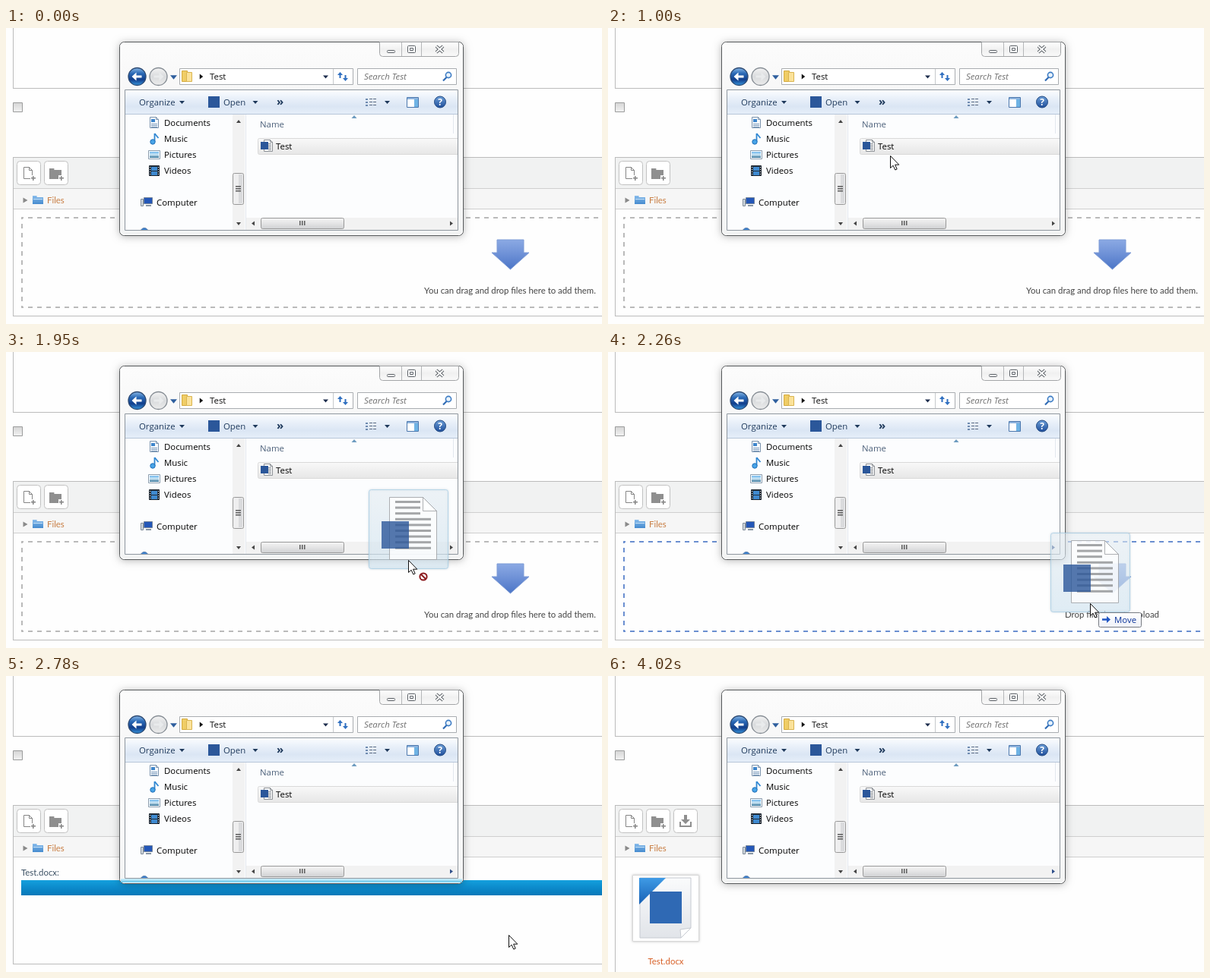
These frames come from a looping animation (784 px wide and 390 px high, 4.88 s). An HTML page with a canvas:

```html
<!DOCTYPE html>
<html lang="en">
<head>
<meta charset="utf-8">
<title>Drag and drop upload</title>
<style>
html, body { margin: 0; width: 100%; height: 100%; overflow: hidden; background: #fff; }
canvas { display: block; }
</style>
</head>
<body>
<canvas id="stage" width="784" height="390"></canvas>
<script>
const ctx = document.getElementById('stage').getContext('2d');
const LOOP = 4880;
const STEP = 78;
const UI = '11.4px "Open Sans", sans-serif';
const WEB = '11.4px Lato, sans-serif';
const LOGO = '#2b579a';
const INK = '#1e395b';

const ENTER = 300, HOVER = 1100, PRESS = 1180, GRAB = 1640, OVER_ZONE = 2030;
const DROP = 2780, DONE = 3090, LEAVE = 3790, GONE = 4020;

// Pointer stops; "out" above 1 slows towards the stop, below 1 speeds up
const STOPS = [
  { at: ENTER, x: 670, y: 362 },
  { at: 1000, x: 371, y: 168, out: 1.6 },
  { at: 1320, x: 364, y: 159, out: 1 },
  { at: GRAB, x: 367, y: 158, out: 1 },
  { at: 1950, x: 529, y: 274, out: .75 },
  { at: 2260, x: 634, y: 331, out: 1.7 },
  { at: 2700, x: 661, y: 341, out: 1.7 },
  { at: LEAVE, x: 661, y: 341, out: 1 },
  { at: GONE, x: 698, y: 388, out: 1 }
];

function pointerAt(t) {
  const next = STOPS.findIndex(stop => stop.at > t);
  const a = STOPS[next - 1], b = STOPS[next];
  const elapsed = Math.floor((t - a.at) / STEP) * STEP;
  const k = 1 - (1 - elapsed / (b.at - a.at)) ** b.out;
  return [Math.round(a.x + (b.x - a.x) * k), Math.round(a.y + (b.y - a.y) * k)];
}

// Drawing helpers

const rect = (x, y, w, h, fill) => { ctx.fillStyle = fill; ctx.fillRect(x, y, w, h); };

function rows(count, gap, x, y, w, h, fill) {
  for (let i = 0; i < count; i++) rect(x, y + i * gap, w, h, fill);
}

function fade(y0, y1, ...colors) {
  const g = ctx.createLinearGradient(0, y0, 0, y1);
  colors.forEach((c, i) => g.addColorStop(i / (colors.length - 1), c));
  return g;
}

function paint(fill, stroke, width = 1) {
  if (fill) { ctx.fillStyle = fill; ctx.fill(); }
  if (stroke) { ctx.strokeStyle = stroke; ctx.lineWidth = width; ctx.stroke(); }
}

function box(x, y, w, h, fill, stroke, r = 0) {
  ctx.beginPath();
  ctx.roundRect(x + .5, y + .5, w - 1, h - 1, r);
  paint(fill, stroke);
}

function poly(points, fill, stroke, width) {
  ctx.beginPath();
  points.forEach(([x, y]) => ctx.lineTo(x, y));
  ctx.closePath();
  paint(fill, stroke, width);
}

function line(x0, y0, x1, y1, color, width = 1) {
  ctx.beginPath();
  ctx.moveTo(x0, y0);
  ctx.lineTo(x1, y1);
  paint(null, color, width);
}

function disc(x, y, r, fill, stroke, width) {
  ctx.beginPath();
  ctx.arc(x, y, r, 0, Math.PI * 2);
  paint(fill, stroke, width);
}

function text(s, x, y, color, font = UI, align = 'left') {
  ctx.font = font;
  ctx.textAlign = align;
  ctx.fillStyle = color;
  ctx.fillText(s, x, y);
}

// Shapes below point down and turn clockwise in quarter turns
function turned(x, y, turns, drawShape) {
  ctx.save();
  ctx.translate(x, y);
  ctx.rotate(turns * Math.PI / 2);
  drawShape();
  ctx.restore();
}

function triangle(x, y, w, h, color, turns = 0) {
  turned(x, y, turns, () => poly([[-w / 2, -h / 2], [w / 2, -h / 2], [0, h / 2]], color));
}

function blockArrow(x, y, w, h, shaft, head, turns, fill, stroke) {
  const neck = h / 2 - head;
  const half = [[shaft / 2, -h / 2], [shaft / 2, neck], [w / 2, neck], [0, h / 2]];
  const mirror = half.map(([px, py]) => [-px, py]).reverse();
  turned(x, y, turns, () => poly([...half, ...mirror], fill, stroke));
}

function page(x, y, w, h, fold, fill, stroke) {
  const bend = x + w - fold;
  poly([[x, y], [bend, y], [x + w, y + fold], [x + w, y + h], [x, y + h]], fill, stroke);
  poly([[bend, y], [x + w, y + fold], [bend, y + fold]], '#fff', stroke);
}

function folder(x, y, w, h, fill) {
  rect(x, y, w * .4, 3, fill);
  rect(x, y + 2, w, h - 2, fill);
}

function plus(x, y) {
  rect(x - 4, y - 4, 8, 8, '#fff');
  rect(x - 3, y - 1, 6, 1.5, '#858585');
  rect(x - 1, y - 3, 1.5, 6, '#858585');
}

const toolButton = x => box(x, 175, 32, 32, '#fff', '#c2c2c2', 4);

// Web page

function drawToolButtons(uploaded) {
  toolButton(14);
  page(23.5, 183.5, 11, 15, 4, '#fff', '#858585');
  plus(36, 198);
  toolButton(50);
  folder(57, 185, 16, 14, '#8f8f8f');
  plus(73, 198);
  if (!uploaded) return;
  toolButton(86);
  blockArrow(102, 189, 12, 12, 4, 6, 0, '#8f8f8f');
  rect(94, 192, 2, 7, '#8f8f8f');
  rect(108, 192, 2, 7, '#8f8f8f');
  rect(94, 197, 16, 2, '#8f8f8f');
}

function drawDropZone(dragOver) {
  ctx.save();
  ctx.setLineDash([6, 6]);
  ctx.lineDashOffset = 3;
  const color = dragOver ? '#6b8fd0' : '#bababa';
  for (const y of [250, 368]) line(20, y, 800, y, color, 2);
  line(21, 249, 21, 369, color, 2);
  ctx.restore();
  blockArrow(663.5, 298.5, 49, 39, 35, 22, 0, fade(-20, 20, '#8caae4', '#6d90d6', '#4a74c6'), '#7f9cd6');
  text(dragOver ? 'Drop files here to upload' : 'You can drag and drop files here to add them.',
    663, 350, '#444', WEB, 'center');
}

function drawFileTile(alpha) {
  ctx.save();
  ctx.globalAlpha = alpha;
  ctx.shadowColor = 'rgba(0,0,0,.25)';
  ctx.shadowBlur = 3;
  rect(32, 262, 88, 88, '#fff');
  ctx.shadowColor = 'transparent';
  box(32, 262, 88, 88, '#fff', '#d8d8d8');
  poly([[42, 266], [109, 266], [109, 332], [96, 345], [42, 345]], fade(266, 345, '#fafbfc', '#e1e4e9'), '#c6cad1');
  poly([[109, 332], [96, 345], [95, 334]], '#fff', '#c6cad1');
  poly([[41, 266], [76, 266], [41, 301]], fade(266, 301, '#3f9be6', '#1760b4'));
  rect(55, 284, 42, 42, '#2f69b4');
  text('Test.docx', 76, 380, '#d86128', WEB, 'center');
  ctx.restore();
}

function drawPage(t) {
  const uploaded = t >= DONE;
  const edge = '#bcbcbc';

  rect(0, 0, 784, 390, '#fefefe');
  rect(9, 0, 1, 80, edge);
  rect(9, 79, 775, 1, edge);
  box(9, 98, 13, 13, fade(98, 111, '#d4d4d4', '#f4f4f4'), '#9a9b9b');

  rect(9, 170, 775, 42, '#f1f2f2');
  rect(9, 211, 775, 28, '#f6f6f6');
  rect(9, 170, 775, 1, edge);
  rect(9, 211, 775, 1, '#cfcfcf');
  rect(9, 238, 775, 1, '#cfcfcf');
  rect(9, 170, 1, uploaded ? 220 : 210, edge);
  if (!uploaded) rect(9, 379, 775, 1, edge);

  drawToolButtons(uploaded);
  triangle(25.5, 227, 7, 6, '#8a8a8a', 3);
  folder(35, 221, 14, 11, fade(220, 233, '#8ec1ee', '#3f86cc'));
  rect(36, 225, 12, 1, '#c4e0f7');
  text('Files', 54, 231, '#c87d42', WEB);

  if (uploaded) {
    drawFileTile(Math.min(1, (Math.floor((t - DONE) / STEP) + 1) / 5));
  } else if (t >= DROP) {
    text('Test.docx:', 20, 263, '#3c5164', WEB);
    rect(20, 269, 764, 20, fade(269, 289, '#14a0dd', '#0c8acb', '#0878b8'));
  } else {
    drawDropZone(t >= OVER_ZONE);
  }
}

// Explorer window

function drawFrame(overBar) {
  ctx.save();
  ctx.shadowColor = 'rgba(0,0,0,.3)';
  ctx.shadowBlur = 11;
  ctx.shadowOffsetY = 1;
  box(149, 18, 453, 256, '#f4f4f4', null, 6);
  ctx.restore();
  box(149, 18, 453, 256, fade(18, 273, '#fcfcfc', '#f6f6f6', '#fafafa', '#f2f3f3'), '#55585a', 6);
  box(150, 19, 451, 254, null, '#fff', 5);
  if (overBar) rect(151, 267, 449, 5, fade(267, 272, '#d5f1fb', '#64c8ee'));

  ctx.beginPath();
  ctx.roundRect(491.5, 18.5, 104, 19, [0, 0, 4, 4]);
  paint(fade(18, 38, '#fff', '#f0f0f0', '#fafafa'), '#a3a5a7');
  rect(520, 19, 1, 18, '#b5b7b9');
  rect(546, 19, 1, 18, '#b5b7b9');
  const glyph = '#5b6066';
  box(501, 29, 11, 4, '#fff', glyph, 1);
  box(528, 23, 11, 10, '#fff', glyph, 1);
  box(531, 26, 5, 4, '#fff', glyph);
  for (const [width, color] of [[4, glyph], [2, '#fff']]) {
    line(566, 24, 575, 32, color, width);
    line(575, 24, 566, 32, color, width);
  }
}

function drawAddressRow() {
  disc(172.5, 64, 11.5, fade(52, 76, '#8dbbe8', '#2a69b6', '#123f8c', '#3a9be0'), '#2c4870', 1.3);
  blockArrow(172, 64, 11, 13, 3, 6, 1, '#fff');
  disc(200.5, 64, 11.5, fade(52, 76, '#f4f4f4', '#d9dbdd', '#ececec'), '#858c93', 1.3);
  blockArrow(201, 64, 11, 13, 3, 6, 3, '#e9ebec');
  triangle(220.5, 65, 9, 5.5, '#2f5f9e');

  box(228, 53, 229, 22, '#fff', '#a9adb1');
  box(231, 56, 8, 15, '#f0cd66', '#d3a93f');
  box(237, 58, 8, 13, '#fbe29a', '#d9b450');
  triangle(257, 64, 7, 4.5, '#111', 3);
  text('Test', 268, 68, '#111');
  triangle(420.5, 64.5, 7, 4, '#1d2d4d');
  rect(430, 54, 1, 20, '#c6c9cc');
  blockArrow(439.5, 62, 7, 8, 2, 4, 2, '#2f6fc0');
  blockArrow(446.5, 66, 7, 8, 2, 4, 0, '#2f6fc0');

  box(462, 53, 131, 22, '#fff', '#a9adb1');
  text('Search Test', 471, 68, '#707070', 'italic ' + UI);
  disc(582, 62, 3.6, '#e9f3fc', '#3d7cc4', 1.6);
  line(579.5, 65, 575, 69.5, '#2f6ab4', 2.2);
}

function drawToolbar() {
  rect(157, 82, 438, 32, fade(82, 114, '#fbfdff', '#e9f0f9', '#dbe6f4', '#e6eff9'));
  rect(157, 113, 438, 1, '#b7c6d9');
  text('Organize', 175, 102, INK);
  rect(266, 90, 15, 15, LOGO);
  text('Open', 286, 102, INK);
  text('»', 356, 102, INK, 'bold 15px "Open Sans", sans-serif');
  for (const x of [231.5, 328, 501.5]) triangle(x, 98, 7, 4, INK);
  rows(3, 4, 473, 93, 3, 2, '#6f8bb0');
  rows(3, 4, 478, 93, 4, 1, '#5c6c83');
  rows(3, 4, 483, 93, 4, 1, '#5c6c83');
  box(527, 91, 16, 14, '#fff', '#4b77ad');
  rect(528, 92, 14, 2, '#8fb4de');
  rect(537, 94, 5, 10, '#6fb3e4');
  disc(571, 97.5, 7.5, fade(90, 105, '#6d9fd8', '#1d4d9a'), '#1f4781');
  text('?', 571, 102, '#fff', 'bold 12px "Open Sans", sans-serif', 'center');
}

function drawNavIcons() {
  page(189.5, 117.5, 11, 14, 3, '#f7fafd', '#7b93ad');
  rect(191, 120, 5, 4, '#3f86cc');
  rows(3, 2, 191, 126, 8, 1, '#7d9cbd');

  line(195.5, 150, 195.5, 139, '#2e86d2', 1.8);
  line(195.5, 139, 200.5, 145, '#2e86d2', 1.8);
  disc(193, 150, 3.2, '#48a4e8', '#1f6fb8');

  box(187, 161, 16, 12, '#fff', '#8a9cae');
  rect(189, 163, 12, 8, fade(163, 171, '#6db5ec', '#cfe8f6', '#2d6f96'));

  box(188, 181, 14, 14, '#23303d', '#1b242e');
  rows(2, 6, 191, 183, 8, 5, '#3f8ad0');
  rows(4, 3, 189, 183, 1, 1, '#fff');
  rows(4, 3, 200, 183, 1, 1, '#fff');

  box(177, 225, 4, 10, '#d7dde3', '#7b8896');
  box(181, 223, 12, 9, '#2457b8', '#75859a');
  rect(184, 233, 7, 2, '#8895a3');
  disc(182, 268.5, 5, '#3b83d4', '#5c7ea8');
}

function drawNavPane() {
  ['Documents', 'Music', 'Pictures', 'Videos'].forEach((s, i) => text(s, 208, 129 + 21 * i, '#000'));
  text('Computer', 198, 234, '#000');
  drawNavIcons();

  rect(298, 114, 16, 153, '#f2f2f2');
  triangle(306, 123, 6, 4, '#444', 2);
  triangle(306, 258, 6, 4, '#444');
  box(298, 191, 15, 42, '#eeeeef', '#989898', 2);
  rect(306, 193, 5, 38, '#dadbdd');
  rows(3, 3, 302, 208, 7, 1.5, '#5c5c5c');
  rect(315, 114, 1, 153, '#e4e8ed');
}

function rowColors(t) {
  if (t >= PRESS && t < GRAB + STEP) return ['#dcebfc', '#c1dbfc', '#7da2ce'];
  if (t >= HOVER && t < PRESS) return ['#f3f8fe', '#e2eefc', '#b8d6fb'];
  return ['#f9f9f9', '#e6e6e6', '#d9d9d9'];
}

function drawFileList(t) {
  text('Name', 334, 131, '#4c607a');
  rect(588, 114, 1, 25, '#e3e8ee');
  triangle(458, 117, 7, 4, '#6d9cc0', 2);

  const [top, bottom, edge] = rowColors(t);
  box(331, 145, 270, 22, fade(145, 167, top, bottom), edge, 2);
  page(339.5, 147.5, 11, 15, 3, '#fff', '#8b8f94');
  rows(5, 2, 345, 152, 4, 1, '#8a8f96');
  rect(335, 150, 10, 10, LOGO);
  text('Test', 355, 160, '#000');

  rect(316, 250, 279, 17, '#f2f2f2');
  triangle(325, 257.5, 6, 4, '#444', 1);
  triangle(586, 257.5, 6, 4, t >= OVER_ZONE ? '#2f4f8a' : '#444', 3);
  box(335, 250, 110, 15, fade(250, 265, '#f6f6f6', '#e4e4e5', '#cfd0d2'), '#989898', 2);
  for (let x = 386; x < 394; x += 3) rect(x, 254, 1.5, 6, '#5c5c5c');
}

function drawWindow(t) {
  drawFrame(t >= DROP && t < DONE);
  drawAddressRow();
  box(156, 81, 439, 186, '#fcfdfe', '#8f979f');
  ctx.save();
  ctx.beginPath();
  ctx.rect(157, 82, 437, 184);
  ctx.clip();
  drawToolbar();
  drawNavPane();
  drawFileList(t);
  ctx.restore();
}

// Pointer and dragged file

function drawDragImage(x, y) {
  ctx.save();
  ctx.translate(x - 52, y - 93);
  ctx.shadowColor = 'rgba(90,120,150,.3)';
  ctx.shadowBlur = 3;
  box(0, 0, 105, 105, fade(0, 105, 'rgba(246,251,254,.5)', 'rgba(222,240,250,.6)'), 'rgba(170,208,230,.8)', 3);
  ctx.shadowColor = 'transparent';
  ctx.globalAlpha = .8;
  page(27.5, 10.5, 62, 82, 18, '#fff', '#9a9da1');
  rows(3, 7.6, 35, 15, 33, 3, '#8f9194');
  rows(6, 7.6, 35, 37.8, 47, 3, '#8f9194');
  rect(17, 42, 36, 36, LOGO);
  ctx.restore();
}

function drawDropHint(x, y, allowed) {
  if (!allowed) {
    disc(x + 20, y + 22, 4.6, '#fff', '#8c1a1e', 2);
    line(x + 17, y + 19, x + 23, y + 25, '#8c1a1e', 2);
    return;
  }
  box(x + 11, y + 12, 57, 20, fade(y + 12, y + 32, '#fff', '#eef0f7'), '#777b82', 2);
  blockArrow(x + 21.5, y + 21.5, 9, 11, 2.5, 5, 3, '#2257c4');
  text('Move', x + 32, y + 26, '#0b3399');
}

function drawPointer(x, y) {
  const shape = [[0, 0], [0, 16], [3.6, 12.7], [6.3, 18.5], [8.7, 17.5], [6.1, 11.7], [11.3, 11.7]];
  poly(shape.map(([dx, dy]) => [x + dx + .5, y + dy + .5]), '#fff', '#111', 1);
}

function draw(t) {
  drawPage(t);
  drawWindow(t);
  if (t < ENTER || t >= GONE) return;
  const [x, y] = pointerAt(t);
  if (t >= GRAB + STEP && t < DROP) {
    drawDragImage(x, y);
    drawDropHint(x, y, t >= OVER_ZONE);
  }
  drawPointer(x, y);
}

const start = performance.now();
function tick() {
  draw((performance.now() - start) % LOOP);
  requestAnimationFrame(tick);
}
tick();
</script>
</body>
</html>
```
